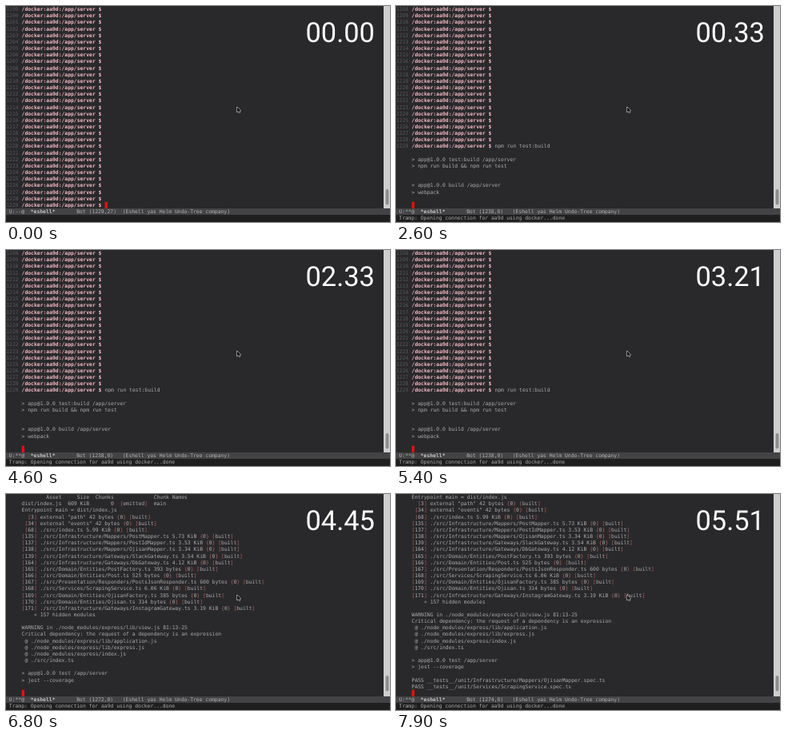
These frames come from a looping animation (480x270 px, 8 s). An HTML page with a canvas:

```html
<!DOCTYPE html>
<html lang="en">
<head>
<meta charset="utf-8">
<title>Terminal build timer</title>
<style>
html, body { margin: 0; width: 480px; height: 270px; overflow: hidden; background: #29292b; }
canvas { display: block; }
</style>
</head>
<body>
<canvas id="stage" width="480" height="270"></canvas>
<script>
const ctx = document.getElementById('stage').getContext('2d');
const LOOP = 8000, COL = 3.845, ROW = 8.16, LEFT = 19.6, ROWS = 31;
const MONO = '6.386px "DejaVu Sans Mono", monospace';
const GREY = '#acacac', PINK = '#f2b9c5', RED = '#b5605f', DIM = '#58585a';
const PROMPT_LINE = 1229;
const PROMPT = '/docker:aa9d:/app/server $ ', COMMAND = 'npm run test:build';

const src = (id, path, size) => `[${id}] ./src/${path}.ts ${size} {0} [built]`;
const output = [
  '',
  '> app@1.0.0 test:build /app/server',
  '> npm run build && npm run test',
  '', '',
  '> app@1.0.0 build /app/server',
  '> webpack',
  '',
  'Hash: 4c1e7f02b9d35a86e410',
  'Version: webpack 4.41.2',
  'Time: 2816ms',
  'Built at: 12/08/2019 4:12:36 PM',
  '        Asset     Size  Chunks             Chunk Names',
  'dist/index.js  609 KiB       0  [emitted]  main',
  'Entrypoint main = dist/index.js',
  '  [3] external "path" 42 bytes {0} [built]',
  ' [34] external "events" 42 bytes {0} [built]',
  ' ' + src(68, 'index', '5.99 KiB'),
  src(135, 'Infrastructure/Mappers/PostMapper', '5.73 KiB'),
  src(137, 'Infrastructure/Mappers/PostIdMapper', '3.53 KiB'),
  src(138, 'Infrastructure/Mappers/OjisanMapper', '3.34 KiB'),
  src(139, 'Infrastructure/Gateways/SlackGateway', '3.54 KiB'),
  src(164, 'Infrastructure/Gateways/DbGateway', '4.12 KiB'),
  src(165, 'Domain/Entities/PostFactory', '393 bytes'),
  src(166, 'Domain/Entities/Post', '525 bytes'),
  src(167, 'Presentation/Responders/PostsJsonResponder', '600 bytes'),
  src(168, 'Services/ScrapingService', '6.06 KiB'),
  src(169, 'Domain/Entities/OjisanFactory', '385 bytes'),
  src(170, 'Domain/Entities/Ojisan', '314 bytes'),
  src(171, 'Infrastructure/Gateways/InstagramGateway', '3.19 KiB'),
  '    + 157 hidden modules',
  '',
  'WARNING in ./node_modules/express/lib/view.js 81:13-25',
  'Critical dependency: the request of a dependency is an expression',
  ' @ ./node_modules/express/lib/application.js',
  ' @ ./node_modules/express/lib/express.js',
  ' @ ./node_modules/express/index.js',
  ' @ ./src/index.ts',
  '',
  '> app@1.0.0 test /app/server',
  '> jest --coverage',
  '',
  'PASS __tests__/unit/Infrastructure/Mappers/OjisanMapper.spec.ts',
  'PASS __tests__/unit/Services/ScrapingService.spec.ts'
];

// [time, value]: each value holds until the next time
const cursorLines = [[0, 1229], [2100, 1230], [2300, 1234], [2500, 1238],
  [5500, 1268], [5700, 1272], [7700, 1273], [7800, 1274]];
const typedCounts = [[0, 0], [1200, 1], [1400, 2], [2100, COMMAND.length]];
const messages = [[0, ''], [1900, "Tramp: Found remote shell prompt on `aa9d'"],
  [2100, 'Tramp: Opening connection for aa9d using docker...done']];
const at = (steps, t) => steps.filter(s => s[0] <= t).pop()[1];

function box(x, y, w, h, color) {
  ctx.fillStyle = color;
  ctx.fillRect(x, y, w, h);
}

function write(str, x, y, color, font = MONO) {
  ctx.font = font;
  ctx.fillStyle = color;
  ctx.fillText(str, x, y);
}

function drawLine(n, y, typed) {
  if (n > PROMPT_LINE) {
    const str = output[n - PROMPT_LINE - 1];
    write(str.replace(/[[\]{}]/g, ' '), LEFT, y, GREY);
    write(str.replace(/[^[\]{}]/g, ' '), LEFT, y, RED);
    return;
  }
  write(n, 0.2, y, DIM);
  write(PROMPT, LEFT, y, PINK, 'bold ' + MONO);
  if (n === PROMPT_LINE) write(COMMAND.slice(0, typed), LEFT + PROMPT.length * COL, y, GREY);
}

function drawBuffer(last, typed) {
  const top = last - ROWS + 1;
  const column = last === PROMPT_LINE ? PROMPT.length + typed : 0;
  for (let r = 0; r < ROWS; r++) {
    const n = top + r;
    if (n < last || n === PROMPT_LINE) drawLine(n, r * ROW + 6.1, typed);
  }
  box(LEFT + 0.2 + column * COL, (ROWS - 1) * ROW, 3.2, ROW, '#fa0d0d');
  return column;
}

function drawModeLine(last, column, modified) {
  const y = 259.2, position = `(${last},${column})`.padEnd(9);
  box(0, 253, 480, 8.2, '#434345');
  write(`U:${modified ? '**' : '--'}@`, COL, y, '#b4b4b4');
  write('*eshell*', 8 * COL, y, '#c4c4c4', 'bold ' + MONO);
  write(`Bot ${position}  (Eshell yas Helm Undo-Tree company)`, 23 * COL - 0.3, y, '#b4b4b4');
}

function drawScrollbar(last) {
  box(472, 0, 8, 253, '#cecece');
  ctx.fillStyle = '#8b8c8d';
  ctx.beginPath();
  ctx.roundRect(474.6, last < 1268 ? 229 : 227, 3.8, 19.5, 1.9);
  ctx.fill();
}

const pointer = new Path2D('M288.7 126v6.6l1.6-1.3 1.1 2.3 1.1-.5-1.1-2.2h2z');
function drawPointer() {
  ctx.fillStyle = '#111';
  ctx.strokeStyle = '#eee';
  ctx.lineWidth = 1;
  ctx.stroke(pointer);
  ctx.fill(pointer);
}

// The stopwatch counts seconds and sixtieths
function drawTimer(t) {
  const ticks = Math.max(0, Math.round((t - 2050) * 0.06));
  const pad = v => String(v).padStart(2, '0');
  write(`${pad(Math.floor(ticks / 60))}.${pad(ticks % 60)}`, 374.5, 45.1, '#fff',
    '34.4px Roboto, Arial, sans-serif');
}

function draw(now) {
  const t = Math.floor(now % LOOP / 100) * 100;
  const last = at(cursorLines, t);
  ctx.textRendering = 'geometricPrecision';
  box(0, 0, 480, 270, '#29292b');
  const column = drawBuffer(last, at(typedCounts, t));
  drawScrollbar(last);
  drawModeLine(last, column, t >= 1900);
  box(0, 261.2, 480, 8.8, '#1f1f20');
  write(at(messages, t), COL, 267.4, GREY);
  drawPointer();
  drawTimer(t);
}

const start = performance.now();
function loop() {
  draw(performance.now() - start);
  requestAnimationFrame(loop);
}
loop();
</script>
</body>
</html>
```
